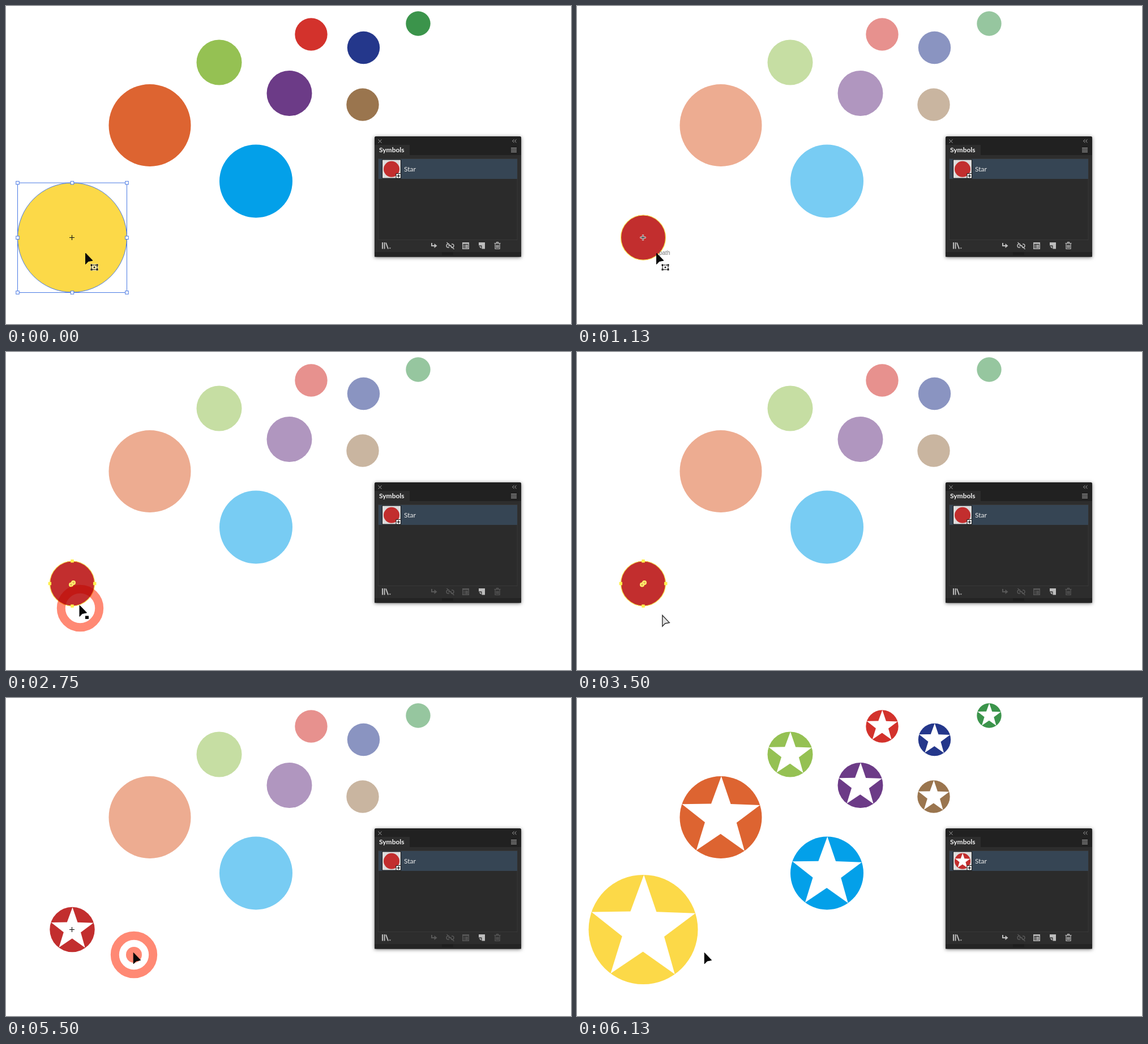
An HTML page that plays this animation: 998 px wide and 561 px high, repeating every 7250 ms.

```html
<!DOCTYPE html>
<html lang="en">
<head>
<meta charset="utf-8">
<title>Editing a symbol</title>
<style>
html, body { margin: 0; width: 100%; height: 100%; overflow: hidden; background: #fff; }
svg { display: block; width: 100%; height: 100%; }
text { font-family: Lato, sans-serif; font-size: 12px; }
#panel { filter: drop-shadow(0 1px 3px #0008); }
#ripples { mix-blend-mode: multiply; }
.icon { fill: none; stroke: #bdbdbd; stroke-width: 1.4; }
.icon .solid { fill: #bdbdbd; stroke: none; }
.off { opacity: .3; }
.hidden { display: none; }
</style>
</head>
<body>
<svg viewBox="0 0 998 561">
  <g id="art"></g>

  <g id="selection" fill="none" stroke="#4a7ae4">
    <circle cx="117" cy="408.5" r="96.5"/>
    <rect x="20.5" y="312" width="193" height="193.5"/>
    <g id="handles" fill="#fff"></g>
  </g>

  <g id="symbol">
    <circle cx="117" cy="408.5" r="39.7" fill="#c22e2e"/>
    <path id="symbolStar" fill="#fff"/>
    <circle id="outline" cx="117" cy="408.5" r="39.5" fill="none" stroke="#fbe94f" stroke-width="1.2"/>
    <g id="anchors" fill="#fff04f"></g>
    <g id="widgets" fill="#e8b25c" stroke="#fff36c" stroke-width="2">
      <circle cx="119" cy="407" r="3"/>
      <circle cx="115" cy="410.5" r="3"/>
    </g>
  </g>

  <g id="cross" fill="none">
    <path id="halo" d="M111.5 408.5h10M116.5 403.5v10" stroke="#fff" stroke-width="3"/>
    <path d="M112 408.5h9M116.5 404v9" stroke="#111" stroke-width="1.1"/>
  </g>

  <g id="panel">
    <rect x="651" y="230" width="259" height="212.5" rx="3" fill="#2d2d2d"/>
    <path d="M651 245v-12q0-3 3-3h253q3 0 3 3v30H713v-18z" fill="#212121"/>
    <path d="M651 434h259v8.5H651z" fill="#242424"/>
    <path d="M770 434.5h20v5h-20z" fill="#1e1e1e"/>
    <rect x="657.5" y="269.5" width="245.5" height="143" fill="#2b2b2b" stroke="#383838"/>
    <path d="M658 270h245v35H658z" fill="#364554"/>
    <g fill="none" stroke="#a8a8a8">
      <path d="M657.5 235.5l6 6m0-6l-6 6M897.5 235.5l-3 2.7 3 2.7m4-5.4l-3 2.7 3 2.7"/>
      <path d="M892 250.5h10m-10 2.4h10m-10 2.4h10m-10 2.4h10"/>
    </g>
    <text x="659" y="258" fill="#f2f2f2" font-weight="700">Symbols</text>
    <text x="703" y="292" fill="#ededed">Star</text>

    <path d="M664.5 271h33v33h-33z" fill="#ddd" stroke="#111"/>
    <circle cx="681" cy="287.8" r="14" fill="#c22e2e"/>
    <path id="thumbStar" fill="#fff"/>
    <path d="M689 295.5h8.5v8.5H689z" fill="#fff" stroke="#111"/>
    <path d="M690.5 299.8h5.5m-2.75-2.75v5.5" stroke="#111" stroke-width="1.3"/>

    <g class="icon">
      <path d="M665 417v11.5m3.5-11.5v11.5m2.5-11l4 11" stroke-width="2"/>
      <path class="solid" d="M676.5 426.5h3.5l-1.75 2z"/>
      <path class="solid" d="M835 417h11v11.5h-5.5v-6H835zM835.5 424h3.8v4z"/>
    </g>
    <g id="actions" class="icon">
      <g><path d="M752 418v5h6" stroke-width="2"/><path class="solid" d="M756.5 419l5 4-5 4z"/></g>
    </g>
    <g id="unlink" class="icon">
      <path d="M783 420h-2a3 3 0 000 6h2m4-6h1a3 3 0 010 6h-2m-5-3h6M778.5 417l13 12"/>
    </g>
    <g id="edits" class="icon">
      <path d="M806.7 417.7h10.6v10.6h-10.6zM806.7 419h10.6M808.5 422h1.5m1 0h5m-7.5 2h1.5m1 0h5m-7.5 2h1.5m1 0h5"/>
      <path d="M862.5 418.7h11m-7-.5v-1.5h3v1.5M864 419.5v9h8v-9m-5.8 2v5.5m1.8-5.5v5.5m1.8-5.5v5.5" stroke-width="1.2"/>
    </g>
  </g>

  <g id="ripples" fill="#ff8974" stroke="#ff8974"></g>
  <text id="hint" x="145" y="438.5" fill="#777" style="font:10px 'Liberation Sans', sans-serif">path</text>

  <g id="cursor">
    <path id="arrow" d="M0 0V19.5L4.8 14.5 12.5 13Z"/>
    <g id="marquee" fill="none">
      <path d="M8.5 19h14v12h-14z" fill="#fff" opacity=".55"/>
      <path d="M10.5 21h10v8h-10z" stroke="#111" stroke-width="1.4" stroke-dasharray="2 1"/>
      <path d="M9 19.5h3v3H9zm10 0h3v3h-3zm-10 8h3v3H9zm10 0h3v3h-3zM14.2 23.7h2.6v2.6h-2.6z" fill="#111"/>
    </g>
    <path id="hoverBox" d="M10 18.5h6v5.5h-6z" fill="#000"/>
  </g>
</svg>

<script>
const LOOP = 7250, TICK = 125;
const ENTER = 9, SELECT = 20, CUT = 30, EXIT = 47;
const $ = id => document.getElementById(id);
const show = (id, on) => $(id).classList.toggle('hidden', !on);

const discs = [
  [117, 408.5, 96.5, '#fcd948'], [254, 210.5, 72.5, '#dd6431'],
  [376.5, 99.5, 40, '#95c153'], [539, 50, 28.7, '#d3322c'],
  [631.5, 73.5, 28.7, '#24378b'], [728, 31, 21.7, '#3b944b'],
  [500.5, 154, 40, '#6c3b87'], [630, 174, 28.7, '#9a754e'],
  [441.5, 309, 64.5, '#03a0e9']
];

function starPath(cx, cy, r) {
  const points = Array.from({ length: 10 }, (_, i) => {
    const angle = i * Math.PI / 5 + .012, radius = i % 2 ? r * .405 : r;
    return [cx + radius * Math.sin(angle), cy - radius * Math.cos(angle)];
  });
  return 'M' + points.join('L') + 'Z';
}

const square = (x, y, size) =>
  `<rect x="${x - size / 2}" y="${y - size / 2}" width="${size}" height="${size}"/>`;

$('art').innerHTML = discs.map(([x, y, r, color]) =>
  `<g><circle cx="${x}" cy="${y}" r="${r}" fill="${color}"/>
   <path class="star" d="${starPath(x, y, r)}" fill="#fff"/></g>`).join('');
$('symbolStar').setAttribute('d', starPath(117, 408.5, 39.2));
$('thumbStar').setAttribute('d', starPath(681, 287.8, 14));

const ring = [[-1, -1], [0, -1], [1, -1], [-1, 0], [1, 0], [-1, 1], [0, 1], [1, 1]];
$('handles').innerHTML = ring.map(([x, y]) => square(117 + x * 96.5, 408.75 + y * 96.75, 5.5)).join('');
$('anchors').innerHTML = ring.filter(([x, y]) => !x || !y)
  .map(([x, y]) => square(117 + x * 39.7, 408.5 + y * 39.7, 5.5)).join('');

// Cursor path: tick, x, y
const path = [
  [13, 140.5, 436], [15, 118, 415], [16, 115, 412], [17, 128.8, 427.5],
  [18, 140, 457], [19, 130, 447], [25, 130, 447], [28, 150.8, 464.5],
  [34, 150.8, 464.5], [36, 180, 459], [38, 219, 450], [39, 225.2, 449.5]
];

function cursorAt(tick) {
  const next = path.findIndex(key => key[0] > tick);
  if (next === 0) return path[0].slice(1);
  if (next < 0) return path[path.length - 1].slice(1);
  const [t0, x0, y0] = path[next - 1], [t1, x1, y1] = path[next];
  const p = (tick - t0) / (t1 - t0);
  return [x0 + (x1 - x0) * p, y0 + (y1 - y0) * p];
}

// Mouse clicks: tick, x, y
const clicks = [[3, 141, 440], [5, 141, 440], [20, 131, 452], [42, 226, 453], [44, 226, 453]];

function ripple([start, x, y], tick) {
  const age = tick - start;
  if (age < 0 || age > 2) return '';
  const at = `cx="${x}" cy="${y}"`;
  return age === 2
    ? `<circle ${at} r="33.7" fill="none" stroke-width="15"/>`
    : `<circle ${at} r="${14 + age * 14}" stroke="none"/>`;
}

function render(time) {
  const tick = Math.floor(time % LOOP / TICK);
  const between = (from, to) => tick >= from && tick < to;
  const isolated = between(ENTER, EXIT), done = tick >= EXIT;

  [...$('art').children].forEach((disc, i) => {
    disc.setAttribute('opacity', isolated ? (i ? .535 : 0) : 1);
    disc.lastElementChild.classList.toggle('hidden', !done);
  });
  show('selection', tick < ENTER);
  show('symbol', isolated);
  show('symbolStar', tick >= CUT);
  show('outline', tick <= CUT);
  show('anchors', between(SELECT, CUT + 1));
  show('widgets', between(SELECT, CUT));
  show('cross', !done && !between(SELECT, CUT));
  show('halo', isolated);
  show('thumbStar', tick >= 48);

  const dimmed = between(10, 49);
  $('actions').classList.toggle('off', dimmed);
  $('edits').classList.toggle('off', dimmed);
  $('unlink').classList.toggle('off', tick >= 10);

  $('ripples').innerHTML = clicks.map(click => ripple(click, tick)).join('');
  show('hint', between(ENTER, 14));
  show('marquee', tick < 14);
  show('hoverBox', between(14, 26));
  $('cursor').setAttribute('transform', `translate(${cursorAt(tick)})`);
  const hollow = between(28, 35);
  $('arrow').setAttribute('fill', hollow ? '#e2e2e2' : '#080808');
  $('arrow').setAttribute('stroke', hollow ? '#333' : '#080808');
  $('arrow').setAttribute('stroke-width', hollow ? 1.4 : 1);
}

const begin = performance.now();
function frame(now) {
  render(Math.max(0, now - begin));
  requestAnimationFrame(frame);
}
render(0);
requestAnimationFrame(frame);
</script>
</body>
</html>
```
